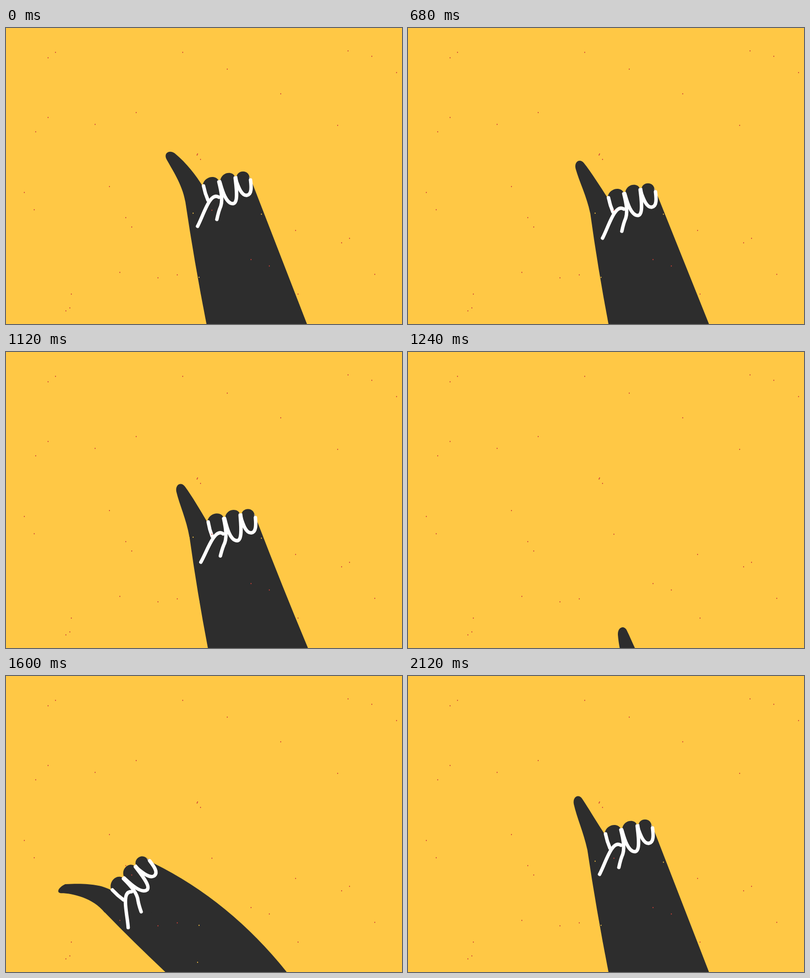
Write an HTML page with a canvas that moves like this. It is 800 px wide and 600 px high and loops after 2160 ms.

```html
<!DOCTYPE html>
<html>
<head>
<meta charset="utf-8">
<style>
html, body { margin: 0; width: 100%; height: 100%; overflow: hidden; background: #ffc845; }
canvas { display: block; }
</style>
</head>
<body>
<canvas id="stage" width="800" height="600"></canvas>
<script>
const ctx = document.getElementById('stage').getContext('2d');
const YELLOW = '#ffc845', DARK = '#2d2d2d', RED = '#cf3f36';
const STEP = 40, STEPS = 54;
const HOME_X = 414, HOME_Y = 305;

// step, hand x, hand y, angle in degrees, thumb bend
const poses = [
  [14, 414, 305, 0, 0],
  [17, 420, 329, 0, .2],
  [20, 419, 325, 0, .4],
  [23, 416, 311.5, 0, .4],
  [28, 424, 330, 2, .2],
  [31, 496, 629, 8, 0],
  [36, 250, 900, -40, 2],
  [38, 212, 560, -40, 2.6],
  [40, 220, 413, -31, 2.4],
  [42, 350, 325, -10, 1.5],
  [44, 454, 296, 7, .4],
  [46, 436, 300, 4, .1],
  [49, 414, 305, 0, 0]
];

const redDots = [
  100,49, 85,60, 357,49, 447,83, 691,46, 739,57, 789,90, 555,133, 85,181,
  60,210, 180,195, 263,171, 670,197, 387,255, 386,257, 393,266, 209,321,
  37,333, 57,368, 242,384, 254,403, 416,369, 585,410, 694,426, 678,435,
  230,495, 307,506, 346,500, 495,469, 532,482, 745,499, 132,539, 129,567,
  121,573, 590,539, 769,612, 477,628
];
const yellowDots = [378,375, 516,377, 390,505, 387,580];

const lerp = (a, b, t) => a + (b - a) * t;

function poseAt(step) {
  const i = poses.findIndex(p => p[0] >= step);
  if (i < 0) return poses[poses.length - 1];
  if (i === 0) {
    // The hand rests while the thumb wags.
    const wag = step < 12 ? (1 + Math.cos((step - .5) * Math.PI / 3.5)) / 2 : 0;
    return [step, HOME_X, HOME_Y, 0, wag];
  }
  const a = poses[i - 1], b = poses[i];
  const t = (step - a[0]) / (b[0] - a[0]);
  return a.map((v, k) => lerp(v, b[k], t));
}

// The grain rests, then jumps three times in each cycle of twelve steps.
function grainShift(step) {
  const k = step % 12;
  return k < 8 ? [0, 0] : k < 9 ? [3, -115] : k < 11 ? [-15, -35] : [-92, -60];
}

function drawArm(x, y, deg) {
  const a = deg * Math.PI / 180, c = Math.cos(a), s = Math.sin(a);
  const place = (u, v) => [x + u * c - v * s, y + u * s + v * c];
  const l = place(-52, 45), r = place(85, 13);
  const left = 405 + deg * (deg < 0 ? 2.68 : 1.43);
  const right = 608 + deg * (deg < 0 ? 1.32 : 1);
  const bottom = Math.max(600, y + 100);
  ctx.beginPath();
  ctx.moveTo(...l);
  ctx.lineTo(...r);
  ctx.quadraticCurveTo((r[0] + right) / 2 - .6 * deg, (r[1] + bottom) / 2 + 1.1 * deg, right, bottom);
  ctx.lineTo(left, bottom);
  ctx.quadraticCurveTo((l[0] + left) / 2 - 3, (l[1] + bottom) / 2, ...l);
  ctx.fill();
}

function drawThumb(bend) {
  const p = (x, y, dx, dy) => [x + dx * bend, y + dy * bend];
  ctx.beginPath();
  ctx.moveTo(362, 351);
  ctx.bezierCurveTo(...p(355, 318, 1, -2), ...p(341, 287, -7, -2), ...p(335, 260, -12, 5));
  ctx.bezierCurveTo(...p(332, 244, -14, 9), ...p(345, 238, -15, 9), ...p(352, 249, -12, 5));
  ctx.bezierCurveTo(...p(364, 267, 1, 7), ...p(382, 297, 2, 2), 397, 320);
  ctx.lineTo(410, 360);
  ctx.fill();
}

const palm = new Path2D(`M362 350 L397 319 C401 300 424 297 430 310 L433 308
  C437 291 458 290 462 301 L466 300 C470 288 487 288 491 299 L499 318
  L470 400 L390 400Z`);
const creases = new Path2D(`M399 320 Q402 335 408 349
  M387 402 C395 387 403 362 412 350 Q421 337 430 343
  M430 312 C435 332 439 352 432 366 Q429 374 426 388
  M432 312 C436 326 444 357 459 356 C470 354 465 322 463 304
  C468 318 475 341 487 339 C498 337 495 318 494 308`);
const gaps = new Path2D('M428 309 L434 308 L440 338 L435 350Z M460 301 L467 300 L471 322 L465 325Z M491 300 L498 318 L494 326Z');

function drawHand(x, y, deg, bend) {
  ctx.save();
  ctx.translate(x, y);
  ctx.rotate(deg * Math.PI / 180);
  ctx.translate(-HOME_X, -HOME_Y);
  ctx.fillStyle = DARK;
  drawThumb(bend);
  ctx.fill(palm);
  ctx.fillStyle = ctx.strokeStyle = '#fff';
  ctx.fill(gaps);
  ctx.lineWidth = 7;
  ctx.lineCap = ctx.lineJoin = 'round';
  ctx.stroke(creases);
  ctx.restore();
}

function drawDots(dots, color, [dx, dy]) {
  ctx.fillStyle = color;
  for (let i = 0; i < dots.length; i += 2) {
    ctx.fillRect(dots[i] + dx - 1, dots[i + 1] + dy - .5, 2, 1.8);
  }
}

function draw(now) {
  const step = Math.floor(now / STEP) % STEPS;
  const [, x, y, deg, bend] = poseAt(step);
  const shift = grainShift(step);
  ctx.fillStyle = YELLOW;
  ctx.fillRect(0, 0, 800, 600);
  ctx.fillStyle = DARK;
  drawArm(x, y, deg);
  drawHand(x, y, deg, bend);
  drawDots(redDots, RED, shift);
  drawDots(yellowDots, YELLOW, shift);
}

const start = performance.now();
function tick() {
  draw(performance.now() - start);
  requestAnimationFrame(tick);
}
tick();
</script>
</body>
</html>
```
